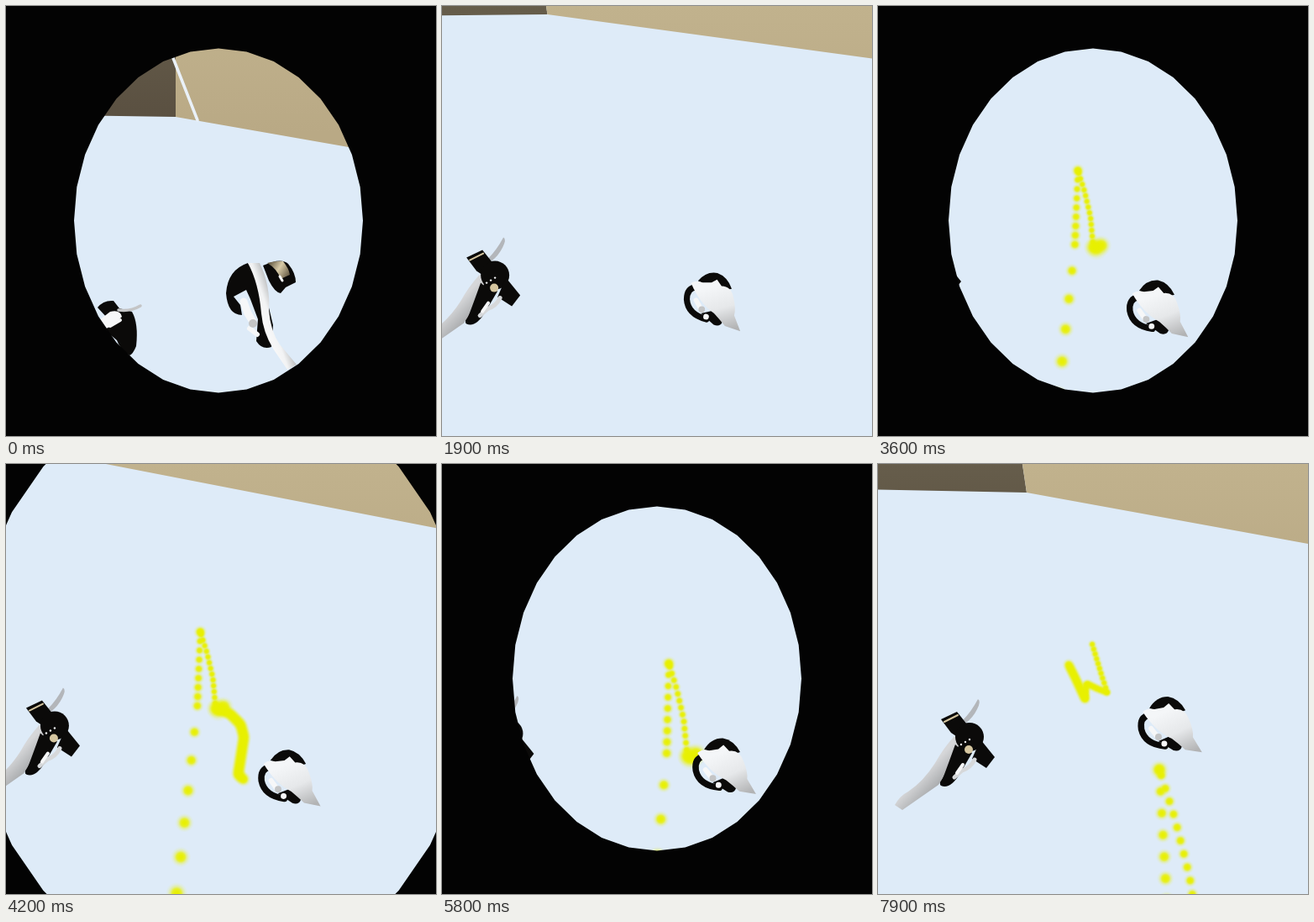
An HTML page with a canvas that plays this animation: 512 by 512 pixels, repeating every 8 s.

```html
<!DOCTYPE html>
<html>
<head>
<meta charset="utf-8">
<style>
html, body { margin: 0; width: 100%; height: 100%; overflow: hidden; background: #000; }
canvas { display: block; width: 100vw; height: 100vh; }
</style>
</head>
<body>
<canvas id="stage" width="512" height="512"></canvas>
<script>
const ctx = document.getElementById('stage').getContext('2d');
const LOOP = 8000, STEP = 100, PICKUP = 500;
const BLACK = '#0b0a09', WHITE = '#f6f7f8', GREY = '#c4c5c6', CREAM = '#d5c6a0';

// --- motion -----------------------------------------------------------
const clamp = u => Math.min(1, Math.max(0, u));
const mix = (a, b, u) => a + (b - a) * u;
const ease = u => u * u * (3 - 2 * u);
const ramp = (t, from, length = 300) => ease(clamp((t - from) / length));
const pulse = (t, from, to, length) => ramp(t, from, length) - ramp(t, to, length);

// Where the room corner and both hands stand at a few moments.
const POSES = [
  { at: 0, corner: [202, 132], slope: .175, left: [-15, 40], right: [300, 355] },
  { at: 1000, corner: [132, 52], slope: .118, left: [-41, 17], right: [304, 357] },
  { at: 2700, corner: [120, -25], slope: .15, left: [-72, -15], right: [311, 350] },
  { at: 3600, corner: [110, -7], slope: .18, left: [-52, -17], right: [317, 365] },
  { at: 4900, corner: [95, 2], slope: .211, left: [-77, 0], right: [327, 397] },
  { at: 6800, corner: [187, 30], slope: .175, left: [0, 0], right: [311, 330] },
  { at: 7900, corner: [177, 34], slope: .182, left: [-12, 4], right: [331, 317] }
];

function poseAt(t) {
  const i = POSES.findIndex(p => p.at >= t), b = POSES[i], a = POSES[Math.max(0, i - 1)];
  const u = a === b ? 0 : ease((t - a.at) / (b.at - a.at));
  const pair = key => a[key].map((v, k) => mix(v, b[key][k], u));
  return { corner: pair('corner'), left: pair('left'), right: pair('right'), slope: mix(a.slope, b.slope, u) };
}

// --- drawing helpers --------------------------------------------------
function gradient(x0, y0, x1, y1, ...colors) {
  const g = ctx.createLinearGradient(x0, y0, x1, y1);
  colors.forEach((c, i) => g.addColorStop(i / (colors.length - 1), c));
  return g;
}

function fill(d, color) {
  ctx.fillStyle = color;
  ctx.fill(new Path2D(d));
}

function line(d, width, color) {
  ctx.lineWidth = width;
  ctx.strokeStyle = color;
  ctx.stroke(new Path2D(d));
}

function disc(x, y, r, color) {
  ctx.fillStyle = color;
  ctx.beginPath();
  ctx.arc(x, y, r, 0, 7);
  ctx.fill();
}

function poly(points, color) {
  ctx.fillStyle = color;
  ctx.beginPath();
  points.forEach(p => ctx.lineTo(...p));
  ctx.fill();
}

// --- room -------------------------------------------------------------
function drawRoom(t, { corner: [x, y], slope }) {
  const top = x - .15 * y * ramp(t, 0, 1000);
  const left = y - (slope - .15) * .6 * x;
  const right = y + slope * (512 - x);
  ctx.fillStyle = '#deebf8';
  ctx.fillRect(0, 0, 512, 512);
  poly([[0, 0], [top, 0], [x, y], [0, left]], gradient(0, 0, 0, 132, '#665d4b', '#5a5041'));
  poly([[top, 0], [512, 0], [512, right], [x, y]], gradient(0, 0, 0, 150, '#c1b28d', '#b9a985'));
  if (t < PICKUP) line(`M${x - 3} ${y - 70}l29 74`, 3.5, '#eaf1f8');
}

// --- paint ------------------------------------------------------------
function along(points, gap, r) {
  const dots = [];
  let carry = 0;
  for (let i = 1; i < points.length; i++) {
    const [ax, ay] = points[i - 1], [bx, by] = points[i];
    const len = Math.hypot(bx - ax, by - ay);
    let s = carry;
    for (; s < len; s += gap) dots.push([mix(ax, bx, s / len), mix(ay, by, s / len), r]);
    carry = s - len;
  }
  return dots;
}

// Evenly dotted near the tip, wider apart further down.
const rise = Array.from({ length: 16 }, (_, k) => {
  const far = Math.max(0, k - 8);
  const y = Math.min(k, 8) * 11 + far * 30 + far * far * 1.2;
  return [-.04 * y - .07 * Math.max(0, y - 88), y, 5 + .018 * y];
}).reverse();
const fall = [[0, 0, 7], ...along([[1, 3], [8, 25], [15, 55], [18, 88]], 7, 4.8)];
const blob = [[22, 92, 12], [19, 91, 10], [28, 89, 10]];
const stem = along([[22, 92], [35, 97], [48, 110], [52, 125], [45, 170], [58, 181], [83, 176]], 3, 7.5);
const bow = along([[83, 176], [103, 115], [97, 82], [81, 68], [62, 76], [45, 92]], 11.5, 5.5);
const slash = along([[0, 0], [8, 16], [20, 42]], 3, 6.5);
const hook = along([[20, 40], [21, 22], [33, 28], [46, 33]], 4, 5.5);
const flick = along([[46, 33], [40, 15], [27, -28]], 6, 4.8);

const glow = ctx.createRadialGradient(0, 0, 0, 0, 0, 1);
[1, .97, .82, .35, .1, 0].forEach((a, i) => glow.addColorStop(i / 5, `rgba(232,240,0,${a})`));

// zoom stretches a stroke downwards more than sideways, as on a floor seen at an angle
function drawStroke(dots, progress, x, y, zoom = 1) {
  const turn = -.085 * (zoom - 1) / 1.35;
  for (const [dx, dy, r] of dots.slice(0, Math.ceil(dots.length * clamp(progress)))) {
    const sx = dx * zoom ** .6, sy = dy * zoom;
    const size = r * 1.25 * zoom ** .4;
    ctx.save();
    ctx.translate(x + sx - sy * turn, y + sy + sx * turn);
    ctx.scale(size, size);
    disc(0, 0, 1, glow);
    ctx.restore();
  }
}

function drawPaint(t, { corner: [x, y] }) {
  const close = 1 - pulse(t, 2800, 5600, 800);
  const tip = [x + mix(128, 158, close), y + mix(203, 330, close), mix(1, 2.35, close)];
  const written = (from, to) => (t - from) / (to - from);
  drawStroke(rise, written(1900, 2600), ...tip);
  drawStroke(fall, written(2800, 3500), ...tip);
  drawStroke(blob, written(3400, 3600), ...tip);
  if (t < 5700) {
    drawStroke(stem, written(3600, 4400), ...tip);
    drawStroke(bow, written(4400, 4900), ...tip);
  }
  drawStroke(slash, written(6300, 6800), x + 50, y + 205);
  drawStroke(hook, written(6900, 7500), x + 50, y + 205);
  drawStroke(flick, written(7500, 7900), x + 50, y + 205);
}

// --- hands ------------------------------------------------------------
function leftHand() {
  fill('M113 301Q123 291 131 276Q135 278 130 288Q125 298 117 304Z', '#b3b6ba');
  fill('M87 300L106 291L118 306L108 322L99 316Z', BLACK);
  line('M91 303L107 295', 2, CREAM);
  fill('M104 325L124 340L110 364Q98 384 87 379Q83 376 92 352Z', BLACK);
  fill('M32 402Q38 391 48 386Q66 374 80 352Q90 334 103 320L110 328L101 344Q95 362 84 378Q64 392 41 408Z',
    gradient(60, 370, 78, 388, '#d6d7d9', '#a5a7a9'));
  fill('M104 330L118 343L107 366Q97 382 86 378Q91 366 96 352Z', BLACK);
  disc(121, 321, 17, BLACK);
  fill('M134 324L151 345L141 358L124 347Z', BLACK);
  line('M127 348Q122 358 112 361L103 369', 5, '#d6d8da');
  line('M113 354L106 364', 4, WHITE);
  disc(120, 336, 5, CREAM);
  for (let i = 0; i < 3; i++) disc(111 + i * 5, 330 - i * 3, 1.2, WHITE);
}

function rightHand() {
  fill('M303 304Q311 290 325 290Q338 292 346 306L341 308L318 308Z', BLACK);
  line('M303 312Q291 314 293.5 329Q298 347 322 349', 7.5, BLACK);
  fill('M314 343L330 336L342 349Q340 356 332 354Z', BLACK);
  line('M305 328L313 338', 6, WHITE);
  disc(321, 346, 3.5, WHITE);
  disc(314, 338, 4, GREY);
  fill('M295 308Q301 303 309 305L320 303L326 298L333 305Q345 303 350 316Q356 330 355 338L366 356L346 353Q338 346 330 340Q310 331 295 308Z',
    gradient(325, 306, 350, 358, '#f4f6f8', '#e6e8ea', '#b2b3b4'));
}

function earlyLeft() {
  fill('M109 359Q116 350 128 351L135 360L150 364Q158 378 155 405Q151 415 147 416Q136 409 132 398L118 386L121 372Z', BLACK);
  fill('M111 374L124 364Q136 361 138 370L126 381L117 385Z', WHITE);
  line('M134 362Q148 364 160 357', 3.5, GREY);
  line('M124 381L136 374', 4, WHITE);
}

function earlyRight() {
  fill('M306 309Q328 299 336 307Q345 318 345 329L333 335L327 342Q320 341 313 327Z', BLACK);
  fill('M311 306Q324 303 330 304Q337 313 338 320L327 325Q323 313 311 306Z', gradient(311, 305, 338, 322, '#4e4532', '#d8cba8', '#5b503c'));
  line('M326 322L329 327', 3, WHITE);
  fill('M288 306Q264 314 262 342Q264 368 281 368L279 356L271 346L286 338L291 349L300 373L298 399Q305 410 316 406L318 380L306 330Z', BLACK);
  line('M283 352L288 366L294 376', 9, WHITE);
  line('M290 384L299 391', 6, WHITE);
  disc(294, 378, 5, GREY);
  fill('M288 306L302 306Q315 333 313 362Q315 388 326 403L346 427L335 433L318 408Q306 388 304 366Q301 330 288 306Z',
    gradient(305, 380, 328, 372, '#fafafa', '#f2f3f4', '#b8babb'));
}

function drawHands(t, { left, right }) {
  ctx.lineCap = 'round';
  if (t < PICKUP) {
    earlyLeft();
    earlyRight();
    return;
  }
  ctx.save();
  ctx.translate(...left);
  leftHand();
  ctx.restore();

  const settle = Math.exp((1000 - t) / 1700);
  const scale = 1 - .07 * settle;
  ctx.save();
  ctx.translate(...right);
  ctx.rotate(.31 * settle);
  ctx.scale(scale, scale);
  ctx.translate(-311, -330);
  rightHand();
  ctx.restore();
}

// --- tunnel vignette --------------------------------------------------
function drawTunnel(t) {
  const open = 1 + pulse(t, 400, 2200) + pulse(t, 4000, 5000) + ramp(t, 6400);
  if (open >= 1.99) return;
  const cx = 253 + 3 * ramp(t, 400);
  ctx.beginPath();
  ctx.rect(0, 0, 512, 512);
  for (let i = 0; i < 32; i++) {
    const a = i * Math.PI / 16;
    const p = [cx + 172 * open * Math.cos(a), 255.5 + 205 * open * Math.sin(a)];
    i ? ctx.lineTo(...p) : ctx.moveTo(...p);
  }
  ctx.closePath();
  ctx.fillStyle = '#030303';
  ctx.fill('evenodd');
}

const start = performance.now();
function draw() {
  const t = Math.floor((performance.now() - start) % LOOP / STEP) * STEP;
  const pose = poseAt(t);
  drawRoom(t, pose);
  drawPaint(t, pose);
  drawHands(t, pose);
  drawTunnel(t);
  requestAnimationFrame(draw);
}
draw();
</script>
</body>
</html>
```
